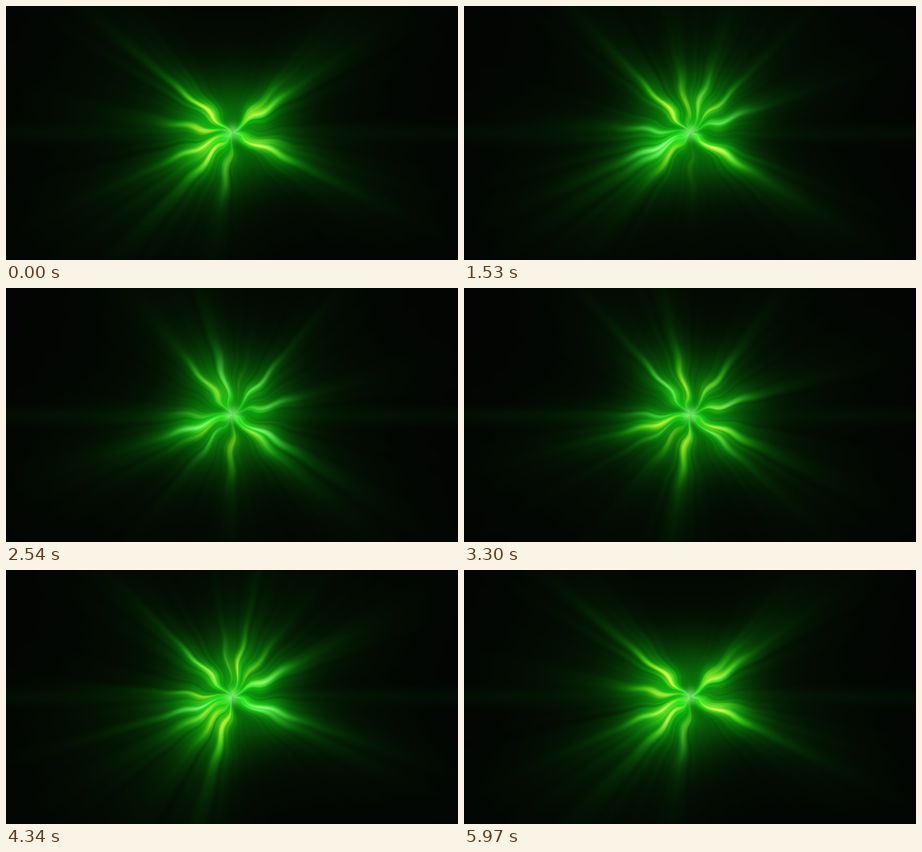
Write an HTML page with a canvas that moves like this. It is 640x360 px and loops after 6000 ms.

```html
<!DOCTYPE html>
<html lang="en">
<head>
<meta charset="utf-8">
<title>Green light burst</title>
<style>
html, body { margin: 0; width: 100%; height: 100%; overflow: hidden; background: #030403; }
canvas { display: block; width: 640px; height: 360px; }
</style>
</head>
<body>
<canvas id="stage" width="640" height="360"></canvas>
<script>
const W = 640, H = 360, LOOP = 6000, BINS = 1440, REACH = 400, TAU = Math.PI * 2;
const ctx = document.getElementById('stage').getContext('2d');
const image = ctx.createImageData(W, H);
const wave = (p, peakAt) => Math.cos(p - peakAt / 360 * TAU);
const byRadius = f => Float32Array.from({ length: REACH }, (_, r) => f(r));
const bell = x => Math.exp(-x * x);

let seed = 7;
function random() {
  seed = seed * 16807 % 2147483647;
  return seed / 2147483647;
}

// Each ray sways about an angle and pulses; degrees run clockwise from the right.
const rays = [];
function ray(angle, sway, swayPeak, power, pulse, pulsePeak, beat = 1) {
  const width = 2.2 + 1.6 * random(), peak = 44 + 16 * random();
  const profile = byRadius(r => {
    const d = r - peak;
    return d < 0 ? bell(d / (peak * 0.5)) : 0.75 * bell(d / 30) + 0.25 * Math.exp(-d / 60);
  });
  rays.push({
    width, profile, beam: new Float32Array(BINS),
    angleAt: p => angle + sway * wave(p, swayPeak),
    powerAt: p => Math.max(0, power + pulse * wave(p * beat, pulsePeak))
  });
}

ray(225, 5.5, 165, 0.9, 0.25, 350);
ray(285, 4, 60, 0.25, 0.35, 180, 2);
ray(262, 5, 340, 0.25, 0.3, 160);
ray(311, 5, 60, 0.4, 0.1, 150);
ray(335, 11, 160, 0.7, 0.25, 320);
ray(26, 7, 100, 0.85, 0.15, 0);
ray(28, 15, 165, 0.4, 0.1, 180);
ray(160, 5, 220, 0.85, 0.15, 80);
ray(130, 3, 30, 0.55, 0.35, 0);
ray(149, 2, 180, 0.4, 0.25, 180, 2);
ray(97, 9, 280, 0.4, 0.35, 260);
ray(184, 4, 0, 0.45, 0.2, 0);

// Distance and slightly bent angle of every pixel.
const radius = new Uint16Array(W * H), bin = new Uint16Array(W * H);
for (let i = 0; i < W * H; i++) {
  const x = i % W - 320, y = Math.floor(i / W) - 179;
  const r = Math.hypot(x, y), a = Math.atan2(y, x);
  const bent = a + 0.35 * Math.exp(-r / 26) * Math.sin(3 * a + r / 9);
  radius[i] = Math.round(r);
  bin[i] = (Math.round(bent / TAU * BINS) + 2 * BINS) % BINS;
}

const haze = byRadius(r => 0.72 * bell(r / 66));
const glow = byRadius(r => 0.42 * Math.exp(-r / 78));
const ring = byRadius(r => 0.85 * bell((r - 38) / 19));
const spark = byRadius(r => 0.5 * bell(r / 10));
const near = byRadius(r => 1 / (1 + (r / 90) ** 4));
const streak = byRadius(y => 0.02 * bell(y / 12));
const tone = Uint8ClampedArray.from({ length: 4000 }, (_, v) => 255 * (1 - Math.exp(-v / 600)));
const shade = v => tone[Math.min(3999, v * 1000 | 0)];

const lobe = new Float32Array(BINS), petal = new Float32Array(BINS), tint = new Float32Array(BINS);

function aim(p) {
  lobe.fill(0);
  petal.fill(0);
  for (const q of rays) {
    const angle = q.angleAt(p), power = q.powerAt(p);
    for (let b = 0; b < BINS; b++) {
      const d = (b * 360 / BINS - angle + 900) % 360 - 180;
      q.beam[b] = power * bell(d / q.width);
      petal[b] += power / (1 + (d / 8) ** 2) ** 2;
      lobe[b] += power / (1 + (d / 19) ** 2) ** 2;
    }
  }
  for (let b = 0; b < BINS; b++) {
    const a = b / BINS * TAU;
    const fine = Math.sin(23 * a + 2 * Math.sin(p)) * Math.sin(14 * a - 1.5 * Math.cos(p))
      + 0.6 * Math.sin(61 * a + 2 * Math.cos(p)) * Math.sin(9 * a + p);
    lobe[b] = Math.min(1.1, lobe[b]) * (1 + 0.22 * fine);
    petal[b] = Math.min(1.2, petal[b]) * (1 + 0.35 * fine);
    tint[b] = 0.5 + 0.5 * Math.sin(5 * a + 2 * Math.sin(p) + 2 * Math.cos(3 * a - p));
  }
}

function draw(time) {
  aim(time % LOOP / LOOP * TAU);
  const px = image.data;
  for (let i = 0, o = 0; i < W * H; i++, o += 4) {
    const r = radius[i], b = bin[i], l = lobe[b], n = near[r], s = spark[r];
    let core = 0;
    for (const q of rays) {
      if (q.beam[b] > 0.004) core += q.beam[b] * q.profile[r];
    }
    const patch = petal[b] * ring[r], gold = tint[b];
    const base = haze[r] * (0.4 + 0.6 * Math.min(1, l)) + glow[r] * (0.15 + 0.85 * l)
      + streak[Math.abs(Math.floor(i / W) - 180)];
    px[o] = 3 + shade(0.04 * base + n * (0.4 * core + patch * (0.15 + 0.6 * gold)) + 0.6 * s);
    px[o + 1] = 4 + shade(base + 0.8 * core + 0.7 * patch + s);
    px[o + 2] = 3 + shade(0.04 * base + n * (0.3 * core * (1.2 - gold) + 0.12 * patch) + 0.5 * s);
    px[o + 3] = 255;
  }
  ctx.putImageData(image, 0, 0);
}

const start = performance.now();
function tick() {
  draw(performance.now() - start);
  requestAnimationFrame(tick);
}
tick();
</script>
</body>
</html>
```
